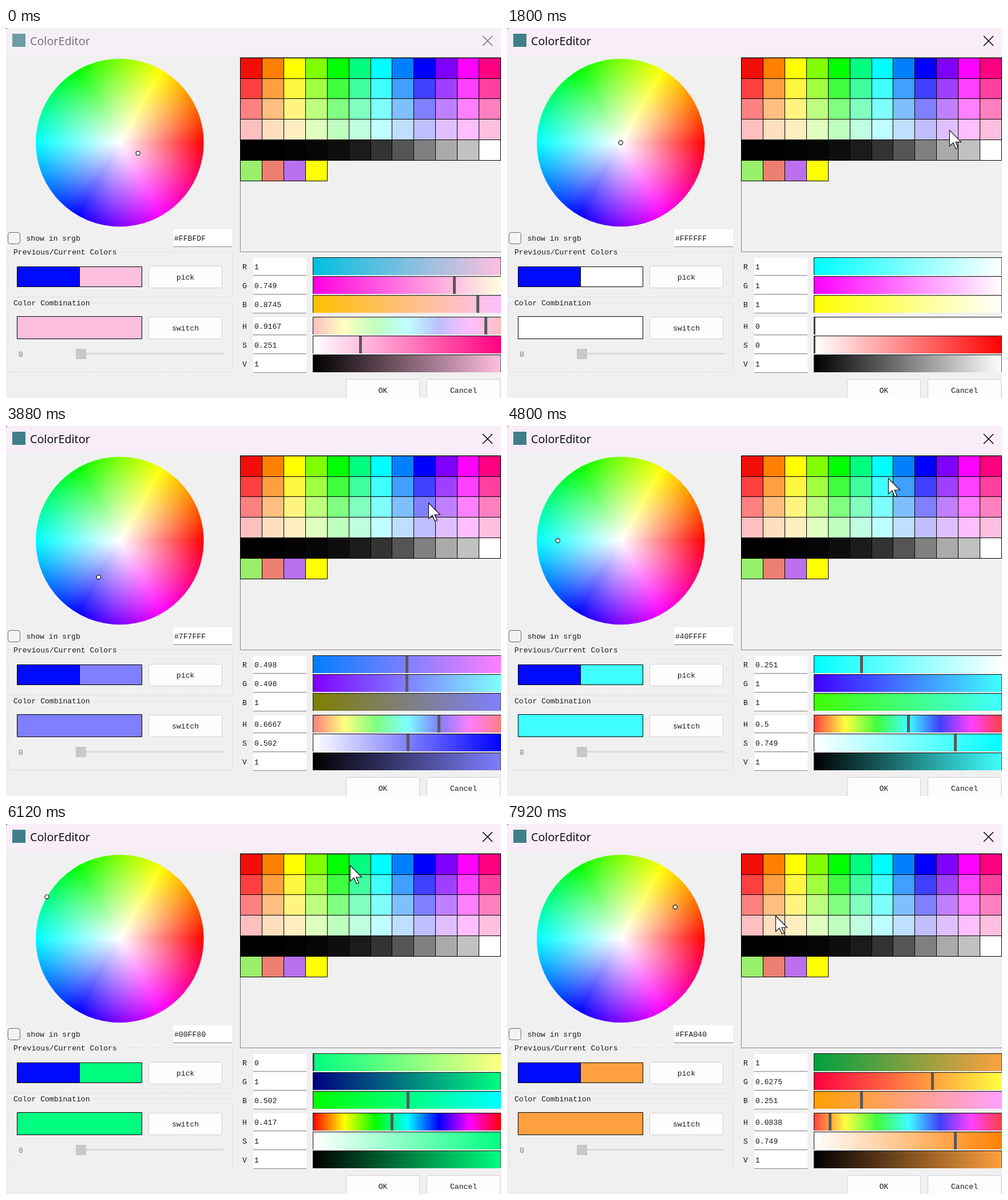
An HTML page with a canvas that plays this animation: 865 px wide and 647 px high, repeating every 8 s.

```html
<!DOCTYPE html>
<html lang="en">
<head>
<meta charset="utf-8">
<title>ColorEditor</title>
<style>
  html, body { margin: 0; width: 100%; height: 100%; overflow: hidden; background: #f0f0f0; }
  canvas { display: block; }
</style>
</head>
<body>
<canvas id="stage" width="865" height="647"></canvas>
<script>
const ctx = document.getElementById('stage').getContext('2d');
const LOOP = 8000;
const PRESS = 80;
const ACTIVATE = 400, TINT = 1400;
const MONO = '13.1px "Liberation Mono", monospace';
const TITLE = '19.7px "Noto Sans", "Open Sans", sans-serif';
const WHEEL = { x: 198.8, y: 200.5, r: 146.8 };
const GRID = { x: 409.9, y: 52.3, w: 37.87, h: 35.83 };
const BARS = { x: 536.5, w: 329.4, rows: [401, 434, 467, 505, 538, 571] };

// leave, arrive, x, y, release, picked color
const moves = [
  [80, 1140, 829, 206, 1280, 'FFFFFF'],
  [1320, 1840, 772, 178, 1960, 'DFBFFF'],
  [1980, 2280, 757, 146, 2600, 'BF7FFF'],
  [3080, 3320, 736, 170, 3440, 'BFBFFF'],
  [3480, 3760, 738, 134, 3880, '7F7FFF'],
  [3920, 4240, 692, 104, 4360, '40A0FF'],
  [4380, 4640, 666, 91, 4720, '40FFFF'],
  [4800, 5320, 650, 62, 5480, '00FFFF'],
  [5840, 6020, 601, 72, 6120, '00FF80'],
  [6200, 6320, 575, 70, 6400, '00FF00'],
  [6440, 6560, 540, 70, 6640, '80FF00'],
  [6800, 7040, 508, 67, 7160, 'FFFF00'],
  [7200, 7460, 470, 67, 7560, 'FF8000'],
  [7600, 7680, 468, 109, 7760, 'FFA040'],
  [7780, 7920, 469, 160]
];

const css = rgb => `rgb(${rgb.map(v => Math.round(v * 255)).join()})`;
const parse = hex => [0, 2, 4].map(i => parseInt(hex.slice(i, i + 2), 16) / 255);

function toRgb(h, s, v) {
  return [5, 3, 1].map(n => {
    const k = (n + h * 6) % 6;
    return v - v * s * Math.max(0, Math.min(k, 4 - k, 1));
  });
}

function toHsv([r, g, b]) {
  const v = Math.max(r, g, b), d = v - Math.min(r, g, b);
  let h = 0;
  if (d) h = v === r ? (g - b) / d : v === g ? 2 + (b - r) / d : 4 + (r - g) / d;
  return [(h + 6) % 6 / 6, v ? d / v : 0, v];
}

function box(x, y, w, h, fill, stroke, radius = 0) {
  ctx.beginPath();
  ctx.roundRect(x, y, w, h, radius);
  if (fill) { ctx.fillStyle = fill; ctx.fill(); }
  if (stroke) { ctx.strokeStyle = stroke; ctx.lineWidth = 1; ctx.stroke(); }
}

function line(x1, y1, x2, y2, color, width = 1) {
  ctx.strokeStyle = color;
  ctx.lineWidth = width;
  ctx.beginPath();
  ctx.moveTo(x1, y1);
  ctx.lineTo(x2, y2);
  ctx.stroke();
}

function text(str, x, y, color = '#1a1a1a', align = 'left', font = MONO) {
  ctx.font = font;
  ctx.fillStyle = color;
  ctx.textAlign = align;
  ctx.fillText(str, x, y);
}

function disc(x, y, r, fill, stroke) {
  ctx.beginPath();
  ctx.arc(x, y, r, 0, Math.PI * 2);
  ctx.fillStyle = fill;
  ctx.fill();
  if (stroke) { ctx.strokeStyle = stroke; ctx.lineWidth = 1.2; ctx.stroke(); }
}

function field(str, x, y, w) {
  box(x, y, w, 30, '#fff');
  line(x, y + 30.5, x + w, y + 30.5, '#868686');
  text(str, x + 2, y + 20);
}

function button(label, x, y) {
  box(x + .5, y + .5, 128, 38, '#fdfdfd', '#d0d0d0', 3);
  text(label, x + 64.5, y + 24, undefined, 'center');
}

function group(label, y, h, labelWidth) {
  ctx.setLineDash([2, 1]);
  box(3.5, y + .5, 392, h, null, '#dadada', 2);
  ctx.setLineDash([]);
  box(11, y - 6, labelWidth, 13, '#f0f0f0');
  text(label, 13, y + 4.5);
}

function drawTitle(active, tinted) {
  box(0, 0, 865, 47, tinted ? '#f9eef8' : '#f5f0f5');
  ctx.fillStyle = '#555';
  ctx.beginPath();
  ctx.moveTo(0, 0);
  ctx.lineTo(4, 0);
  ctx.quadraticCurveTo(0, 0, 0, 4);
  ctx.fill();
  box(11, 10, 23, 23, active ? '#3f7f8a' : '#6d9ca4');
  const ink = active ? '#000' : '#777';
  text('ColorEditor', 42, 30, active ? '#111' : '#777', 'left', TITLE);
  line(833, 14, 850, 31, ink, 1.6);
  line(850, 14, 833, 31, ink, 1.6);
}

function drawWheel([h, s]) {
  const { x, y, r } = WHEEL;
  const hues = ctx.createConicGradient(0, x, y);
  for (let i = 0; i <= 12; i++) hues.addColorStop(i / 12, css(toRgb(1 - i / 12, 1, 1)));
  const fade = ctx.createRadialGradient(x, y, 0, x, y, r);
  fade.addColorStop(0, 'rgba(255,255,255,1)');
  fade.addColorStop(1, 'rgba(255,255,255,0)');
  disc(x, y, r, hues);
  disc(x, y, r, fade);
  const a = h * Math.PI * 2;
  disc(x + Math.cos(a) * s * r, y - Math.sin(a) * s * r, 3.6, '#fff', '#111');
}

function cell(col, row, fill, stroke = '#000') {
  const left = Math.floor(GRID.x + col * GRID.w), right = Math.floor(GRID.x + (col + 1) * GRID.w);
  const top = Math.floor(GRID.y + row * GRID.h), bottom = Math.floor(GRID.y + (row + 1) * GRID.h);
  box(left + .5, top + .5, right - left, bottom - top, fill, stroke);
}

function drawPalette() {
  box(409.5, 51.5, 470, 340, null, '#858585');
  const yellowGreen = [255, 246, 244, 238];
  const greys = [0, 0, 2, 5, 14, 27, 51, 85, 128, 170, 193, 255];
  for (let row = 0; row < 4; row++) {
    for (let col = 0; col < 12; col++) {
      const rgb = toRgb(col / 12, 1 - row / 4, 1);
      if (col === 2) rgb[1] = yellowGreen[row] / 255;
      cell(col, row, css(rgb));
    }
  }
  cell(0, 0, '#f20e08');
  greys.forEach((g, col) => cell(col, 4, `rgb(${g},${g},${g})`));
  ['#9aef6c', '#ec7f72', '#ba70ec', '#ffff00'].forEach((c, col) => cell(col, 5, c));
}

function drawBars(rgb, hsv) {
  const values = [...rgb, ...hsv];
  const swap = (i, v) => rgb.map((c, j) => j === i ? v : c);
  const [h, s, v] = hsv;
  const ramp = [
    u => swap(0, u), u => swap(1, u), u => swap(2, u),
    u => toRgb(u, s, v), u => toRgb(h, u, v), u => toRgb(h, s, u)
  ];
  BARS.rows.forEach((y, i) => {
    text('RGBHSV'[i], 413, y + 21);
    field(String(+values[i].toFixed(4)), 432, y + 1, 93);
    const shade = ctx.createLinearGradient(BARS.x, 0, BARS.x + BARS.w, 0);
    for (let k = 0; k <= 12; k++) shade.addColorStop(k / 12, css(ramp[i](k / 12)));
    box(536, y, 329, 31, shade);
    line(536, y + .5, 865, y + .5, '#111');
    line(536.5, y, 536.5, y + 31, '#111');
    const left = Math.round(BARS.x - 2.3 + values[i] * BARS.w);
    const from = Math.max(left, 537);
    box(from, y + 1, left + 5 - from, 30, '#595959');
  });
}

function drawLeft(color, hex) {
  box(3.5, 357.5, 21, 20, '#f3f3f3', '#666', 4);
  text('show in srgb', 35.5, 372);
  field('#' + hex, 292, 352, 103);
  group('Previous/Current Colors', 391, 79, 186);
  box(19.5, 417.5, 109, 35, '#000aff', '#000');
  box(128.5, 417.5, 109, 35, color, '#000');
  button('pick', 249, 416);
  group('Color Combination', 480, 121, 138);
  box(19.5, 504.5, 218, 39, color, '#000');
  button('switch', 249, 505);
  text('0', 22, 575, '#777');
  box(122.5, 568.5, 257, 2, '#e7eaea', '#d2d2d2');
  box(122, 561, 18, 18, '#c8c8c8');
}

function cursorAt(t) {
  let x = 866, y = 655;
  for (const [leave, arrive, toX, toY] of moves) {
    if (t < leave) break;
    const p = Math.min(1, (t - leave) / (arrive - leave));
    const e = p * p * (3 - 2 * p);
    x += (toX - x) * e;
    y += (toY - y) * e;
  }
  return [x, y];
}

function drawCursor([x, y], pressed) {
  if (pressed) {
    const col = Math.floor((x - GRID.x) / GRID.w), row = Math.floor((y - GRID.y) / GRID.h);
    cell(col, row, null, '#ffee20');
    disc(x, y, 20.5, 'rgba(246,228,72,.8)');
  }
  ctx.save();
  ctx.translate(x, y);
  const arrow = new Path2D('M.5 .5V28L7 22 11.5 32.5 15.5 31 11 21H20.5Z');
  ctx.fillStyle = '#fff';
  ctx.strokeStyle = '#111';
  ctx.lineWidth = 1.2;
  ctx.fill(arrow);
  ctx.stroke(arrow);
  ctx.restore();
  if (pressed) disc(x, y, 20.5, 'rgba(246,228,72,.5)');
}

function render(t) {
  const hex = moves.reduce((last, m) => t >= m[4] ? m[5] : last, 'FFBFDF');
  const pressed = moves.some(m => t >= m[4] - PRESS && t < m[4]);
  const rgb = parse(hex), hsv = toHsv(rgb);
  box(0, 0, 865, 647, '#f0f0f0');
  drawTitle(t >= ACTIVATE, t >= TINT);
  drawWheel(hsv);
  drawPalette();
  drawLeft('#' + hex, hex);
  drawBars(rgb, hsv);
  button('OK', 594, 614);
  button('Cancel', 735, 614);
  drawCursor(cursorAt(t), pressed);
}

const start = performance.now();
function tick() {
  render((performance.now() - start) % LOOP);
  requestAnimationFrame(tick);
}
tick();
</script>
</body>
</html>
```
